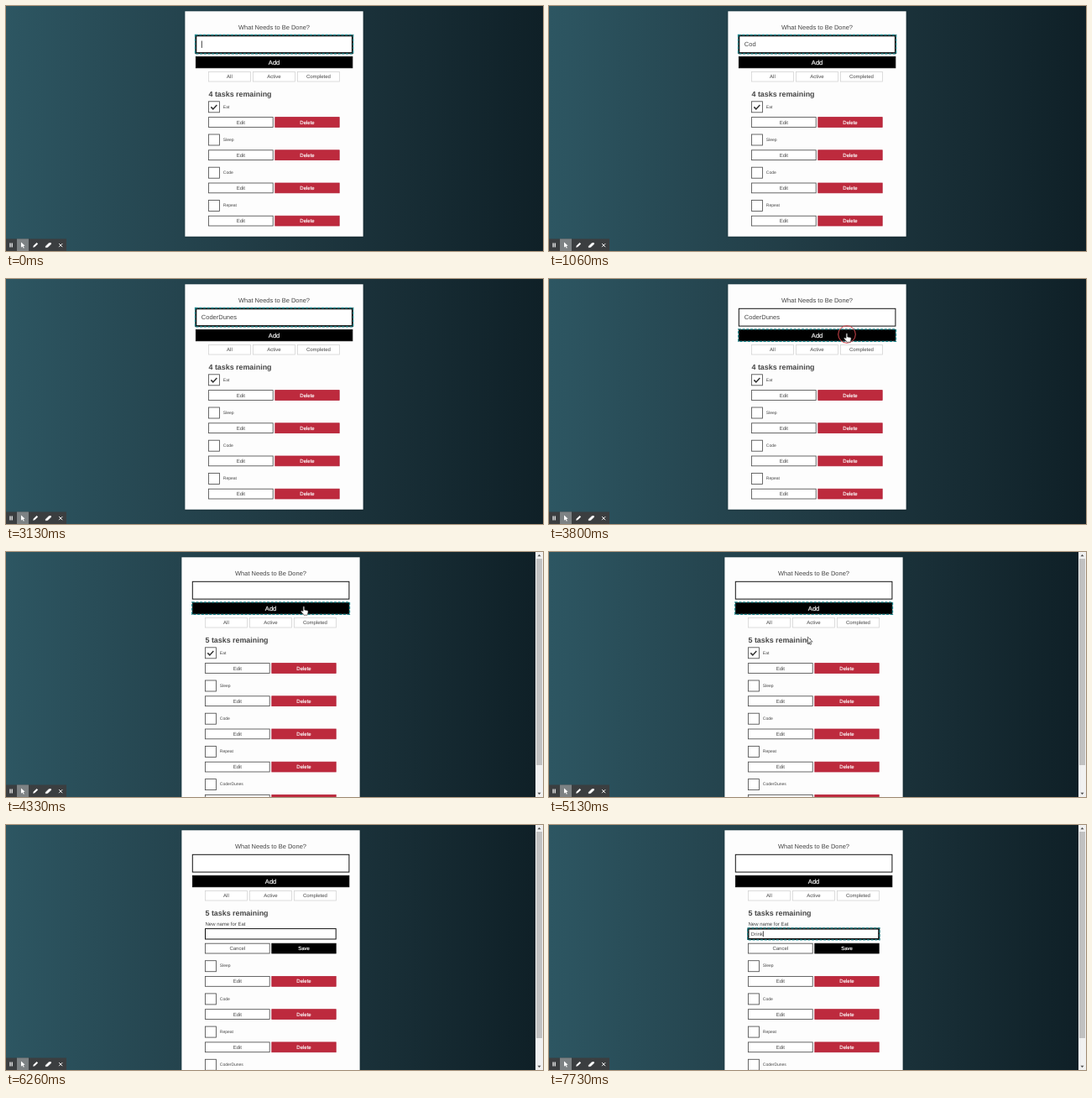
Recreate the animation shown at these times as an HTML page. Size 640 by 292 pixels, loop 8000 ms.

```html
<!DOCTYPE html>
<html lang="en">
<head>
<meta charset="utf-8">
<title>Task list</title>
<style>
  html, body { margin: 0; width: 100%; height: 100%; overflow: hidden; background: #0f2027; }
  svg { display: block; width: 640px; height: 292px; }
  text { font-family: "Liberation Sans", Arial, sans-serif; fill: #454545; text-rendering: geometricPrecision; white-space: pre; }
  .mid { text-anchor: middle; }
  .light { fill: #fff; stroke: #fff; stroke-width: .16; }
  .box { fill: #fff; stroke: #4d4d4d; stroke-width: .85; }
  .tab { fill: #fff; stroke: #cfcfcf; stroke-width: .7; }
  .field { fill: #fff; stroke: #111; stroke-width: 1; }
  .field.on { stroke-width: 2; }
  .danger { fill: #bd2a3d; stroke: #b32237; stroke-width: .8; }
  .dark { fill: #000; stroke: #000; stroke-width: .8; }
  .focus { fill: none; stroke: #20898f; stroke-width: 1.3; stroke-dasharray: 3.2 1.5; }
  .caret { stroke: #111; stroke-width: .8; }
</style>
</head>
<body>
<svg id="stage" viewBox="0 0 640 292">
  <defs>
    <linearGradient id="night">
      <stop offset="0" stop-color="#2d5662"/>
      <stop offset=".5" stop-color="#203a43"/>
      <stop offset="1" stop-color="#0f2027"/>
    </linearGradient>
    <filter id="soft" x="-10%" y="-10%" width="120%" height="120%">
      <feDropShadow dx="0" dy=".7" stdDeviation=".9" flood-opacity=".25"/>
    </filter>
  </defs>
  <rect id="back" width="640" height="292" fill="url(#night)"/>
  <g id="page"></g>
  <g id="bar">
    <rect x="631" width="9" height="292" fill="#f1f1f1"/>
    <rect x="632" y="8" width="7" height="246" fill="#c1c1c1"/>
    <path d="M633.5 5.2l2-2.4 2 2.4zM633.5 286.8l2 2.4 2-2.4z" fill="#555"/>
  </g>
  <g id="tools">
    <rect y="277.5" width="72" height="14.5" fill="#3b3e40"/>
    <rect x="13" y="277.5" width="14" height="14.5" fill="#7d8284"/>
    <path d="M5 282.6v5M7.2 282.6v5" stroke="#fff" stroke-width="1.2"/>
    <path d="M18 281.6l4.6 4.2-2 .2 1.2 2.3-1 .5-1.1-2.4-1.7 1.4z" fill="#fff"/>
    <path d="M32.2 287.8l.5-2 3.9-3.9 1.5 1.5-3.9 3.9z" fill="#fff"/>
    <path d="M47.2 286.4l3.8-3.6 2.4-.4.3 1.3-3.8 3.6-2.5.5z" fill="#fff" stroke="#fff" stroke-width=".7"/>
    <path d="M63.2 283.2l4 4M67.2 283.2l-4 4" stroke="#fff" stroke-width="1"/>
  </g>
  <g id="mouse">
    <circle id="ring" r="10.3" fill="#d8494f" fill-opacity=".04" stroke="#d5474e" stroke-width="1"/>
    <path id="hand" d="M-.9 4.6V-.4a.8.8 0 0 1 1.6 0V3l3.5.7q1 .3.9 1.4l-.6 2.8-.4 1.3h-4.1l-1-1.5-2.4-2.7q-.3-1 .7-1.1z" fill="#fff" stroke="#333" stroke-width=".6"/>
    <path id="arrow" d="M0 0v8l1.9-1.7 1.3 2.9 1.3-.6-1.3-2.8h2.6z" fill="#fff" stroke="#222" stroke-width=".6"/>
  </g>
</svg>
<script>
const NS = "http://www.w3.org/2000/svg";
const LOOP = 8000;
const TASK = "CoderDunes", RENAME = "Drink";
const TASK_KEYS = [60, 260, 460, 1200, 1530, 1800, 2130, 2260, 2330, 2460];
const RENAME_KEYS = [7000, 7130, 7260, 7400, 7600];
const PRESS_ADD = 3800, ADDED = 4000, PRESS_EDIT = 5600, EDITING = 5800, PICK_FIELD = 6400;
const PITCH = 39.2;

const $ = id => document.getElementById(id);
const page = $("page");

function el(parent, tag, attrs, content) {
  const node = document.createElementNS(NS, tag);
  for (const key in attrs) node.setAttribute(key, attrs[key]);
  if (content) node.textContent = content;
  parent.append(node);
  return node;
}
const group = parent => el(parent, "g", {});
const rect = (parent, x, y, width, height, cls) =>
  el(parent, "rect", { x, y, width, height, class: cls });
const label = (parent, x, y, size, content, cls = "") =>
  el(parent, "text", { x, y, "font-size": size, class: cls }, content);
const show = (node, on) => node.setAttribute("visibility", on ? "inherit" : "hidden");

function button(parent, x, y, width, height, content, cls, textCls = "", size = 6) {
  rect(parent, x, y, width, height, cls);
  label(parent, x + width / 2, y + height / 2 + size * .35, size, content, "mid " + textCls);
}

function field(parent, x, y, width, height, textX, size) {
  const frame = rect(parent, x, y, width, height, "field");
  const ring = rect(parent, x - .8, y - .8, width + 1.6, height + 1.6, "focus");
  const mid = y + height / 2;
  const text = label(parent, textX, mid + size * .35, size, "");
  const caret = el(parent, "line", { y1: mid - size * .56, y2: mid + size * .56, class: "caret" });
  return (value, focused, caretOn) => {
    text.textContent = value;
    frame.classList.toggle("on", focused);
    show(ring, focused);
    show(caret, focused && caretOn);
    const end = textX + (value ? text.getComputedTextLength() : 0) + .5;
    caret.setAttribute("x1", end);
    caret.setAttribute("x2", end);
  };
}

function task(parent, name, index) {
  const g = group(parent), y = index * PITCH;
  rect(g, 241.4, 113.8 + y, 13, 13, "box");
  label(g, 258.8, 121.6 + y, 5, name);
  button(g, 241.4, 132.6 + y, 76.8, 11.8, "Edit", "box");
  button(g, 320.8, 132.6 + y, 76.4, 11.8, "Delete", "danger", "light");
  return g;
}

const card = rect(page, 213.4, 6.3, 212.2, 268.4, "");
card.setAttribute("fill", "#fdfdfd");
card.setAttribute("filter", "url(#soft)");
label(page, 319.5, 27.5, 7.5, "What Needs to Be Done?", "mid");
const setTaskField = field(page, 226.3, 35.3, 186.6, 20.8, 232.8, 7.5);
button(page, 226.3, 60.4, 186.6, 13.4, "Add", "dark", "light", 7.6);
const addFocus = rect(page, 225.7, 59.8, 187.8, 14.6, "focus");
["All", "Active", "Completed"].forEach((name, i) =>
  button(page, 241.4 + i * 53, 78.4, 50, 11.6, name, "tab"));
const heading = label(page, 241.5, 107.5, 8.9, "");
heading.setAttribute("font-weight", "bold");

const eat = task(page, "Eat", 0);
el(eat, "path", { d: "M244.3 120.4l2.5 2.5 4.5-4.9", fill: "none", stroke: "#333", "stroke-width": 1.5 });
const editFocus = rect(eat, 240.7, 131.9, 78.2, 13.2, "focus");

const rest = group(page);
["Sleep", "Code", "Repeat"].forEach((name, i) => task(rest, name, i + 1));
const added = task(rest, TASK, 4);

const editor = group(page);
label(editor, 241.5, 119.6, 6, "New name for Eat");
const setRenameField = field(editor, 241.5, 123.6, 155.7, 12.4, 244.8, 6);
button(editor, 241.4, 141.2, 76.8, 11.8, "Cancel", "box");
button(editor, 320.8, 141.2, 76.4, 11.8, "Save", "dark", "light");

const typed = (word, keys, t) => word.slice(0, keys.filter(k => k <= t).length);
const blink = (keys, start, t) => {
  const last = Math.max(start, ...keys.filter(k => k <= t));
  return Math.floor((t - last) / 530) % 2 === 0;
};
const ease = (t, from, to) => {
  const p = Math.min(1, Math.max(0, (t - from) / (to - from)));
  return p * p * (3 - 2 * p);
};
const within = (t, from, to) => t >= from && t < to;

function drawMouse(t) {
  const arrive = ease(t, 3460, 3660), move = ease(t, 4730, 5530);
  const x = 362 - 7 * arrive - 93 * move;
  const y = 62 + 4 * arrive + 70 * move;
  const overButton = y < 74 || (y > 78 && y < 90) || y > 132;
  show($("mouse"), within(t, 3460, EDITING + 60));
  show($("hand"), overButton);
  show($("arrow"), !overButton);
  show($("ring"), within(t, PRESS_ADD, PRESS_ADD + 260) || within(t, PRESS_EDIT, PRESS_EDIT + 260));
  $("mouse").setAttribute("transform", `translate(${x} ${y})`);
}

function draw(t) {
  const full = t >= ADDED, editing = t >= EDITING;
  $("back").setAttribute("width", full ? 631 : 640);
  page.setAttribute("transform", `translate(${full ? -4 : 0} 0)`);
  card.setAttribute("height", full ? 310 : 268.4);
  heading.textContent = `${full ? 5 : 4} tasks remaining`;
  show($("bar"), full);
  show(added, full);
  show(eat, !editing);
  show(editor, editing);
  rest.setAttribute("transform", `translate(0 ${editing ? 8.7 : 0})`);

  setTaskField(full ? "" : typed(TASK, TASK_KEYS, t), t < PRESS_ADD, blink(TASK_KEYS, 0, t));
  setRenameField(typed(RENAME, RENAME_KEYS, t), t >= PICK_FIELD, blink(RENAME_KEYS, PICK_FIELD, t));
  show(addFocus, within(t, PRESS_ADD, PRESS_EDIT));
  show(editFocus, within(t, PRESS_EDIT, EDITING));
  drawMouse(t);
}

const start = performance.now();
function tick() {
  draw((performance.now() - start) % LOOP);
  requestAnimationFrame(tick);
}
tick();
</script>
</body>
</html>
```
